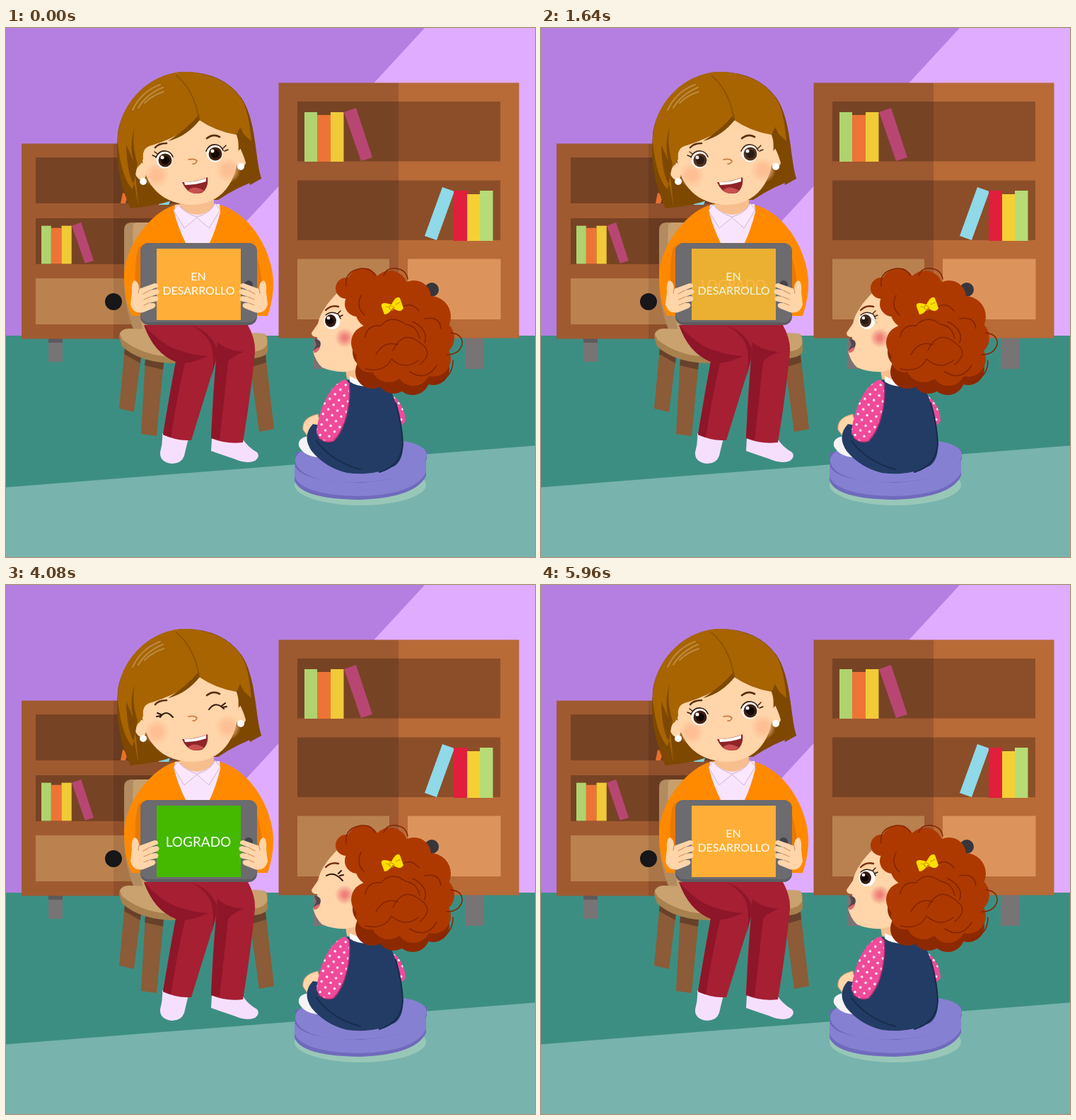
Write an HTML page that moves like this. It is 748x748 px and loops after 6 s.

```html
<!DOCTYPE html>
<html lang="es">
<head>
<meta charset="utf-8">
<title>En desarrollo / Logrado</title>
<style>
html,body{margin:0;width:100%;height:100%;overflow:hidden}
svg{display:block;width:100vw;height:100vh}
text{font-family:"Comic Sans MS","Comic Neue",Lato,sans-serif;fill:#fff;text-anchor:middle}
.line{fill:none;stroke-linecap:round;stroke-linejoin:round}
.skin{fill:#ffd5a9}
</style>
</head>
<body>
<svg viewBox="0 0 748 748">
<defs>
  <radialGradient id="blush"><stop offset=".35" stop-color="#fdbf93"/><stop offset="1" stop-color="#fdbf93" stop-opacity="0"/></radialGradient>
  <radialGradient id="rosy"><stop offset=".2" stop-color="#ef7f78"/><stop offset="1" stop-color="#ef7f78" stop-opacity="0"/></radialGradient>
  <pattern id="dots" width="13" height="15" patternUnits="userSpaceOnUse" patternTransform="translate(3 3) rotate(8)">
    <rect width="13" height="15" fill="#f04a9b"/><circle cx="3" cy="3" r="1.700" fill="#fff"/><circle cx="9.500" cy="10.500" r="1.700" fill="#fff"/>
  </pattern>
</defs>

<!-- room -->
<rect width="748" height="748" fill="#b57fe1"/>
<path d="M592 0H748V436H190Z" fill="#e0acff"/>
<rect y="435" width="748" height="313" fill="#3d8e82"/>
<path d="M0 649.500L748 590.500V748H0Z" fill="#78b3ad"/>

<!-- left cabinet -->
<path d="M60 439h20v33h-20z" fill="#787375"/><path d="M60 439h20v6h-20z" fill="#5d5a5e"/>
<path d="M22 163.500H152V439.500H22Z" fill="#a05a30"/><path d="M152 163.500H282V439.500H152Z" fill="#8f502b"/>
<path d="M42 183H152V248H42ZM42 269H152V334H42Z" fill="#774325"/>
<path d="M152 183H262V248H152ZM152 269H262V334H152Z" fill="#693b21"/>
<path d="M42 354H152V419H42Z" fill="#bb824f"/><path d="M152 354H262V419H152Z" fill="#ab7647"/>
<circle cx="152" cy="387" r="12" fill="#171619"/>
<g id="books1"></g>
<path d="M165 233l8 3-4 12h-7z" fill="#e8702e"/><path d="M216 245h16l-2 5h-14z" fill="#82d3df"/>

<!-- right cabinet -->
<path d="M434 438h26v44h-26zM650 438h26v44h-26z" fill="#787375"/>
<path d="M385.500 77.500H555V438.500H385.500Z" fill="#9d5930"/><path d="M555 77.500H725.500V438.500H555Z" fill="#b86a37"/>
<path d="M412 104H555V188.500H412ZM412 215.500H555V300H412Z" fill="#774325"/>
<path d="M555 104H699V188.500H555ZM555 215.500H699V300H555Z" fill="#8b4e29"/>
<path d="M412 326.500H542V412H412Z" fill="#b9814f"/><path d="M568 326.500H699.500V412H568Z" fill="#dc945c"/>
<circle cx="602" cy="370" r="10" fill="#38363b"/>
<g id="books2"></g>
<path d="M617 225l17 6-25 69-17-6z" fill="#8fd9e8"/><path d="M633 230h19v71h-19z" fill="#e11f3c"/>
<path d="M652 235h18v66h-18z" fill="#f6cf35"/><path d="M670 230h18.500v71h-18.500z" fill="#b7db75"/>

<!-- chair -->
<path d="M168 452L191 464 181 543 160 538Z" fill="#8c5b37"/>
<path d="M344 468L367 462 379 567 358 571Z" fill="#8c5b37"/>
<path d="M197 468L223 473 213 577 191 574Z" fill="#8c5b37"/>
<path d="M168 453l23 11-1 10-23-13zM197 468l26 5-1 10-26-6zM346 468l21-6 1 11-20 6z" fill="#68412a"/>
<path d="M167 286Q167 275 178 275H216V435H184Q168 400 167 360Z" fill="#b28b60"/>
<path d="M180 277Q176 340 194 430H216V275H186Z" fill="#c7a06e"/>
<path d="M160 437Q160 426 174 426L364 432Q370 434 370 442V457Q368 465 350 467L240 474Q190 474 164 450Z" fill="#a8814f"/>
<path d="M161 433Q163 425 174 425L364 432Q370 434 369 447Q366 457 345 458L240 465Q196 465 165 441Z" fill="#c9a26f"/>

<!-- legs -->
<path d="M221 573L258 580Q255 592 252 605Q248 616 235 616Q217 614 218 600Q222 586 221 573Z" fill="#f6dffc"/>
<path d="M291 580H334Q341 592 355 600Q360 606 352 612Q340 617 322 609Q304 603 290 598Z" fill="#f6dffc"/>
<path d="M195 420H342Q353 440 352 458Q346 520 335 586Q312 589 290 580Q292 520 297 470L262 583Q241 584 222 575Q232 512 240 472Q213 459 195 420Z" fill="#a61f33"/>
<path d="M240 472L222 575 233 579Q242 520 253 474Q268 472 285 464Q262 462 246 456Q222 450 195 420Q209 460 240 472Z" fill="#8f1529"/>
<path d="M262 421Q288 428 299 455L291 495Q296 470 290 448Q282 430 262 421ZM297 470L290 580 302 582Q310 510 314 472Q320 464 336 458Q312 456 299 444Z" fill="#8f1529"/>

<!-- cardigan and shirt -->
<path d="M243 249C205 258 168 310 167 348Q167 388 178 407H370Q379 380 378 357C375 310 342 258 298 249Z" fill="#ff8a00"/>
<path d="M187 310Q178 342 187 404L198 402V304ZM345 304Q362 330 363 380L352 400Z" fill="#ed7800"/>
<path d="M239 250L302 249 303 260Q297 285 287 306H255Q243 282 238 261Z" fill="#f9e4fd"/>
<path d="M246 235H294V253Q270 275 246 253Z" fill="#f7be8e"/>
<path d="M243 250Q255 263 270 267Q288 263 296 248L303 257 287 283 270 268 252 283 237 258Z" fill="#fbe8fe" stroke="#cdb4d4" stroke-width="1"/>

<!-- woman's head -->
<path d="M252 62C208 64 164 101 158 151Q153 205 176 255Q213 252 240 242L300 243Q328 224 361 213C352 183 354 130 333 99Q306 62 252 62Z" fill="#7e4800"/>
<ellipse class="skin" cx="190" cy="202" rx="8" ry="13" transform="rotate(-12 190 202)"/>
<ellipse class="skin" cx="333" cy="184" rx="8" ry="14" transform="rotate(8 333 184)"/>
<path class="skin" d="M192 165C189 218 217 250 264 250C309 249 336 209 327 147L273 122Z"/>
<circle cx="213" cy="208" r="18" fill="url(#blush)"/><circle cx="314" cy="201" r="18" fill="url(#blush)"/>
<path d="M158 164C157 103 208 60 256 62C298 64 325 84 336 106Q344 124 347 160L336 150 340 172 326 151Q296 146 273 130Q246 154 206 166Q192 169 194 185L190 193Q180 200 184 217L187 250Q164 242 158 164Z" fill="#a76400"/>
<path d="M186 192Q177 163 182 140Q174 165 180 188L170 165Q171 208 182 223L187 251 176 255Q160 220 158 164Q164 214 179 228ZM274 130Q256 153 229 160Q257 142 273 122ZM326 151L331 140Q351 176 361 213L345 222Q341 190 332 172Z" fill="#7e4800"/>
<g class="line">
  <path d="M241 67Q267 89 273 130" stroke="#8b5100" stroke-width="1.500"/>
  <path d="M179 116Q191 90 218 80M187 113Q198 94 222 84M196 106Q207 95 223 90" stroke="#bd8a40" stroke-width="2"/>
  <path d="M211 169Q216 163 227 163M284 156Q293 149 302 154" stroke="#5a2e10" stroke-width="2.600"/>
  <path d="M258 186Q267 184 270 188Q268 193 264 192" stroke="#c9793f" stroke-width="1.700"/>
</g>
<circle cx="194" cy="217" r="5" fill="#fff"/><circle cx="332" cy="196" r="5" fill="#fff"/>
<path d="M249 218Q268 218 285 211Q287 226 277 233Q257 238 249 218Z" fill="#8e2528"/>
<path d="M252 218Q270 218 283 212L283 217Q268 222 253 222Z" fill="#fff"/>
<path d="M257 230Q265 221 280 230Q268 238 257 230Z" fill="#c9504e"/>

<!-- girl -->
<ellipse cx="501" cy="646" rx="93" ry="29" fill="#98c7b8"/>
<path d="M408 627V640Q417 666 500 667Q580 664 594 633V618Z" fill="#706abd"/>
<path d="M408 617V635Q421 661 500 662Q578 660 594 628V609Z" fill="#8680d2"/>
<path d="M409 600V620Q420 642 500 643Q580 638 595 609V596Z" fill="#6b64b8"/>
<path d="M409 613C407 591 455 583 540 582Q596 585 595 605Q590 628 555 635C490 650 414 643 409 613Z" fill="#8680d2"/>
<path d="M441 546Q418 551 420 568L427 578 447 572Z" class="skin" stroke="#db9c71"/>
<path d="M427 577Q412 580 414 591Q421 605 440 607L441 590Z" fill="#f6f3f5"/>
<path d="M544 518Q563 530 565 555Q560 565 550 562Z" fill="url(#dots)"/>
<path d="M481 498Q484 543 466 565Q451 563 434 560Q418 577 432 598Q452 622 482 629Q520 634 550 619Q563 609 561 584Q557 544 546 517L520 500Z" fill="#233c65"/>
<path class="line" d="M439 584Q462 614 501 624M551 530Q560 560 561 588Q559 619 528 628" stroke="#172b4b" stroke-width="2"/>
<path d="M480 497C456 503 441 545 439 572Q446 590 464 584C482 564 488 526 485 502Z" fill="url(#dots)"/>
<path class="line" d="M485 502C488 528 481 566 463 584Q451 588 442 579" stroke="#b82f72" stroke-width="1.500"/>
<path d="M478 470L482 496 520 508 526 470Z" fill="#f7be8e"/>
<path d="M486 492Q499 500 521 500L519 507Q497 508 486 500Z" fill="#fff"/>
<path class="skin" d="M469 374C455 388 444 403 441 418L432 431Q432 437 440 437L441 447 434 457Q438 472 447 480Q463 487 482 486L528 475V390Z"/>
<path d="M436 439Q449 441 443 453L434 457 439 448Z" fill="#55474e"/>
<path d="M435 456Q442 450 444 452Q441 460 435 459Z" fill="#dc696a"/>
<circle cx="479" cy="438" r="14" fill="url(#rosy)"/>
<path class="line" d="M452 399Q460 391 470 394" stroke="#772c0a" stroke-width="2.400"/>
<g id="curls"></g>
<g class="line" stroke="#842400" stroke-width="1.500">
  <path d="M481 365Q478 344 502 340Q517 339 522 350M534 350Q538 338 552 340Q566 342 568 355"/>
  <path d="M629 431Q646 433 645 447Q641 462 623 462M632 470Q632 496 605 502"/>
  <path d="M508 437Q511 419 530 421Q545 404 565 419Q581 421 585 439M523 462Q535 441 554 448M547 456Q562 424 588 447Q605 460 585 476M508 482Q535 488 545 468Q564 485 583 470M571 486Q594 501 609 477M557 398Q571 384 584 400M592 411Q613 407 615 425M507 406Q494 394 502 378M575 415Q598 427 592 445"/>
</g>
<path d="M545 391Q529 386 531 394L535 405Q541 405 547 396Q558 404 562 396L557 382Q552 377 545 391Z" fill="#ffdf00"/>
<path class="line" d="M543 392l6 3-2 4-5-2zM537 394l5 1M551 391l6-3" stroke="#d39a00" stroke-width="1.200"/>

<!-- eyes -->
<g id="open">
  <g id="eye">
    <ellipse cx="224" cy="186" rx="11.500" ry="12.500" fill="#fff"/><circle cx="225" cy="187" r="9.500" fill="#40200f"/>
    <circle cx="225" cy="187" r="6" fill="#120805"/><circle cx="221" cy="183" r="2.500" fill="#fff"/>
    <path class="line" d="M212 183Q216 173 226 174Q233 175 236 182" stroke="#32170b" stroke-width="1.700"/>
  </g>
  <use href="#eye" x="71" y="-9"/>
  <path class="line" d="M212 182l-5-2M214 178l-4-3M307 170l4-4M309 174l5-2" stroke="#32170b" stroke-width="1.400"/>
  <ellipse cx="461" cy="414" rx="11.500" ry="12" fill="#fff"/><ellipse cx="459" cy="414" rx="8" ry="9" fill="#34190e"/>
  <circle cx="458" cy="414" r="5" fill="#120805"/><circle cx="456" cy="410" r="2.300" fill="#fff"/>
  <path class="line" d="M452 406Q460 399 470 405L473 411M469 404l4-4M472 408l4-2" stroke="#32170b" stroke-width="1.400"/>
</g>
<g id="closed" class="line" stroke="#32170b" stroke-width="2">
  <path d="M218 187Q226 175 236 187M219 185l-6 1M219 183l-5-2M287 176Q296 163 308 175M306 173l6-1M305 171l5-4"/>
  <path d="M453 411Q464 404 476 418M472 411l5-1M470 408l4-4"/>
</g>

<!-- tablet -->
<rect x="190" y="304" width="165" height="116" rx="12" fill="#5d5c60"/>
<rect x="190" y="304" width="165" height="112" rx="12" fill="#6c6b6f"/>
<circle cx="343" cy="363" r="6" fill="#434248"/>
<rect x="213" y="312" width="119" height="101" fill="#ffaf37"/>
<text x="272" y="357" font-size="16">EN</text>
<text x="272.500" y="377" font-size="16">DESARROLLO</text>
<g id="done">
  <rect x="213" y="312" width="119" height="101" fill="#44b900"/>
  <text x="272" y="369.500" font-size="19">LOGRADO</text>
</g>

<!-- hands -->
<g id="hand">
  <path class="skin" d="M178 374Q177 359 182 357Q188 359 188 369L210 361Q216 361 215 366L203 371 213 369Q219 371 215 376L204 380 212 379Q218 381 214 386L202 389 209 389Q214 392 209 396L194 402Q180 405 176 391Z"/>
  <path class="line" d="M188 369L187 375M203 371L194 376M204 380L195 384M202 389L195 392" stroke="#d9945f" stroke-width="1.200"/>
</g>
<use href="#hand" transform="matrix(-1 0 0 1 546 0)"/>
</svg>
<script>
const LOOP = 6000, FADE = 800, FADE_IN = 1560, FADE_OUT = 5080;
const $ = id => document.getElementById(id);

// The same row of four books stands in both cabinets.
function books(id, x, y, k) {
  $(id).setAttribute('transform', `translate(${x} ${y}) scale(${k})`);
  $(id).innerHTML = [
    ['M0 6h18v70h-18z', '#afd36e'], ['M18 10h19v66h-19z', '#ed7436'],
    ['M37 6h18.500v70h-18.500z', '#f0ca37'], ['M56 6l17-6 23 70-16 5z', '#b84673']
  ].map(([d, fill]) => `<path d="${d}" fill="${fill}"/>`).join('');
}
books('books1', 50, 275, .77);
books('books2', 422, 113, 1);

// Hair is a cluster of round curls: x, y, radius.
const ball = fill => ([x, y, r]) => `<circle cx="${x}" cy="${y}" r="${r}" fill="${fill}"/>`;
const shade = [[518,486,24],[548,494,23],[575,495,24],[604,482,23],[514,458,24]];
const light = [[481,368,15],[505,364,24],[497,390,18],[543,368,25],[577,381,24],[600,408,29],[608,438,26],
  [604,468,25],[576,482,24],[541,476,25],[513,445,25],[514,468,19],[550,420,45],[519,400,25],[575,440,38]];
$('curls').innerHTML = shade.map(ball('#8d2900')).join('') + light.map(ball('#ad3900')).join('');

const clamp = v => Math.max(0, Math.min(1, v));
function draw() {
  const t = performance.now() % LOOP;
  const a = clamp((t - FADE_IN) / FADE) - clamp((t - FADE_OUT) / FADE);
  $('open').style.opacity = 1 - a;
  $('closed').style.opacity = $('done').style.opacity = a;
  requestAnimationFrame(draw);
}
draw();
</script>
</body>
</html>
```
